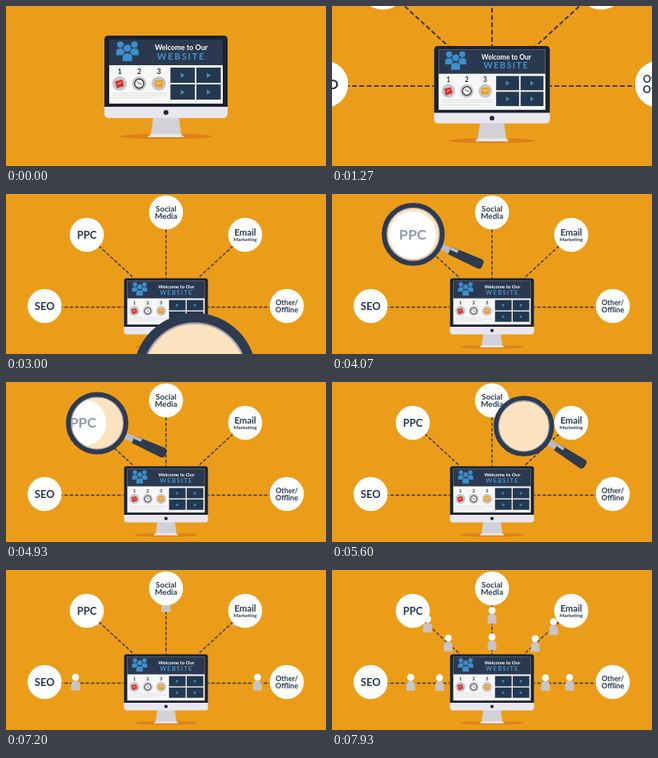
Animation of 400x200 px, one loop 8 s. Source, as an HTML page:

```html
<!DOCTYPE html>
<html lang="en">
<head>
<meta charset="utf-8">
<title>Marketing channels</title>
<style>
  html, body { margin: 0; width: 100%; height: 100%; overflow: hidden; background: #eb9d19; }
  svg { display: block; width: 100vw; height: 100vh; }
  text { font-family: Lato, "Open Sans", sans-serif; font-weight: 700; text-anchor: middle; }
  #channels text { fill: #2b394e; }
  #links line { stroke: #40373a; stroke-width: 1.5; stroke-dasharray: 4.3 2.3; }
</style>
</head>
<body>
<svg viewBox="0 0 400 200">
  <defs>
    <clipPath id="glass"><circle r="33.5"/></clipPath>
    <g id="person">
      <path d="M-5.5 10V3.5Q-5.5-2 0-2T5.5 3.5V10Z" fill="#c9c4c6"/>
      <circle cy="-6.5" r="4.4" fill="#fff"/>
    </g>
    <g id="member">
      <circle cy="-9" r="5"/>
      <path d="M-6.5 7.500V2Q-6.500-3 0-3T6.500 2V7.500Z"/>
    </g>
    <g id="tile">
      <rect width="30.5" height="19" fill="#24384f"/>
      <path d="M13 6.500l5 3.200-5 3.200z" fill="#4489bb"/>
    </g>
  </defs>
  <rect width="400" height="200" fill="#eb9d19"/>

  <g id="scene">
    <g id="links"></g>
    <g id="people"></g>
    <g id="channels"></g>
    <g transform="translate(200 251.5) scale(.682) translate(-200 -251.5)">
      <ellipse cx="200" cy="163" rx="58" ry="3.2" fill="#dd7f1b"/>
      <path d="M184 139H216L219 161H181Z" fill="#d3d1d8"/>
      <path d="M181 160H219L223 164H177Z" fill="#e9e7ec"/>
      <rect x="123" y="37" width="154" height="103" rx="5" fill="#e9e7ee"/>
      <path d="M123 126V42Q123 37 128 37H272Q277 37 277 42V126Z" fill="#1c222e"/>
      <circle cx="200" cy="133" r="3.1" fill="#2b2a33"/>
      <rect x="129" y="42" width="142" height="80" fill="#f7f7f8"/>
      <rect x="129" y="42" width="142" height="32" fill="#2a394f"/>
      <g fill="#3f8fcb">
        <use href="#member" transform="translate(143 55.5) scale(.8)"/>
        <use href="#member" transform="translate(160.500 55.5) scale(.8)"/>
        <use href="#member" x="151.700" y="61.800" stroke="#2a394f"/>
      </g>
      <text x="219" y="55.500" font-size="9" fill="#fff">Welcome to Our</text>
      <text x="219" y="66.800" font-size="11.300" letter-spacing="1.700" fill="#4393cf">WEBSITE</text>
      <g font-size="9" fill="#34343c">
        <text x="142" y="85">1</text><text x="166.500" y="85">2</text><text x="191" y="85">3</text>
      </g>
      <g fill="#c6c5c9">
        <circle cx="142" cy="97" r="9"/><circle cx="166.500" cy="97" r="9"/><circle cx="191" cy="97" r="9"/>
      </g>
      <path d="M136.500 94l9-2 2 8-9 3z" fill="#d8322f"/>
      <path d="M140 97.500l4-2" stroke="#fff"/>
      <circle cx="166.500" cy="97" r="5.700" fill="#fff" stroke="#35353d" stroke-width="1.400"/>
      <path d="M164 94.500l2.500 2.500h3" fill="none" stroke="#35353d"/>
      <rect x="186" y="92.500" width="10" height="9" rx="1" fill="#f0a022"/>
      <path d="M188 95q3 4 6 0" fill="none" stroke="#fff"/>
      <path d="M133 109H201M133 112H201M133 115H185" stroke="#d6d5d8" stroke-width=".8"/>
      <use href="#tile" x="205.500" y="77"/><use href="#tile" x="238" y="77"/>
      <use href="#tile" x="205.500" y="98"/><use href="#tile" x="238" y="98"/>
    </g>
  </g>

  <g id="lens">
    <g id="handle">
      <rect x="36" y="-4" width="16" height="8" fill="#b9bac2"/>
      <path d="M50-5L90-6.500Q95-6.500 95-2V2Q95 6.500 90 6.500L50 5Z" fill="#2e3a4d"/>
      <path d="M50-3H60" stroke="#b9bac2" stroke-width="4"/>
    </g>
    <g clip-path="url(#glass)">
      <circle r="34" fill="#f7c781"/>
      <g id="view"><use href="#channels"/></g>
      <circle r="34" fill="#fff" opacity=".5"/>
    </g>
    <circle r="36" fill="none" stroke="#2e3a4f" stroke-width="6.800"/>
    <circle r="32.800" fill="none" stroke="#a9a9b0" stroke-width="1.200"/>
  </g>
</svg>

<script>
const LOOP = 8000, SPEED = 0.065, WALK_AT = 7930;
const $ = id => document.getElementById(id);

// at: bubble centre, port: line end at the monitor, walkers: distances from the bubble at WALK_AT
// lines: [text, font size, baseline offset]
const channels = [
  { at: [48.3, 140], port: [150, 141.5], walkers: [50, 86], lines: [['SEO', 13, 4.5]] },
  { at: [101, 51], port: [163, 108], walkers: [25, 60], lines: [['PPC', 13, 4.5]] },
  { at: [200, 23], port: [200, 108], walkers: [34, 67], lines: [['Social', 10, -1.5], ['Media', 10, 8]] },
  { at: [299, 51], port: [237, 108], walkers: [30, 61], lines: [['Email', 11.3, 0.8], ['Marketing', 6.4, 7.8]] },
  { at: [351, 140], port: [250, 141.5], walkers: [54, 84], lines: [['Other/', 9.2, -1.5], ['Offline', 9.2, 7.8]] }
];

function add(parent, tag, attrs, text = '') {
  const el = document.createElementNS('http://www.w3.org/2000/svg', tag);
  for (const key in attrs) el.setAttribute(key, attrs[key]);
  el.textContent = text;
  return parent.appendChild(el);
}

for (const c of channels) {
  const [x1] = c.port;
  // side lines run level, just below the bubble centres
  c.end = c.at[1] > 100 ? [c.at[0], c.port[1]] : c.at;
  c.link = add($('links'), 'line', { x1, y1: c.port[1], x2: x1, y2: c.port[1] });
  c.people = c.walkers.map(() => add($('people'), 'use', { href: '#person' }));
  c.bubble = add($('channels'), 'g', {});
  add(c.bubble, 'circle', { r: 21.3, fill: '#fff' });
  for (const [label, size, y] of c.lines) add(c.bubble, 'text', { y, 'font-size': size }, label);
}

const mix = (a, b, p) => a + (b - a) * p;
const span = (t, from, to) => Math.min(1, Math.max(0, (t - from) / (to - from)));
const ease = p => (1 - Math.cos(Math.PI * p)) / 2;
const place = (el, value) => el.setAttribute('transform', value);

function drawChannels(t) {
  const zoom = mix(1, 0.682, ease(span(t, 870, 2270))) / 0.682;
  place($('scene'), `translate(200 251.5) scale(${zoom}) translate(-200 -251.5)`);
  const grow = ease(span(t, 70, 720));
  const pop = ease(span(t, 480, 870));
  for (const { at: [x, y], end, port: [px, py], walkers, link, people, bubble } of channels) {
    link.setAttribute('x2', mix(px, end[0], grow));
    link.setAttribute('y2', mix(py, end[1], grow));
    place(bubble, `translate(${x} ${y}) scale(${pop})`);
    const length = Math.hypot(px - x, py - y);
    people.forEach((person, i) => {
      const d = walkers[i] + (t - WALK_AT) * SPEED;
      person.style.display = d > 0 ? '' : 'none';
      place(person, `translate(${mix(x, px, d / length)} ${mix(y, py, d / length)})`);
    });
  }
}

function drawLens(t) {
  const enter = ease(span(t, 2600, 3750));
  const slide = ease(span(t, 4700, 6130));
  const leave = span(t, 6700, 7250) ** 2;
  const x = mix(286, 101.5, enter) + 198 * slide + 180 * leave;
  const y = mix(291, 50.3, enter) + 6 * Math.sin(Math.PI * slide) + 30 * leave;
  const scale = mix(90, 39, enter) / 39 - 0.05 * Math.sin(Math.PI * slide);
  $('lens').style.display = t > 2600 && t < 7250 ? '' : 'none';
  place($('lens'), `translate(${x} ${y}) scale(${scale})`);
  place($('handle'), `rotate(${24 + 18 * slide * slide})`);
  place($('view'), `scale(1.38) translate(${-x} ${-y})`);
}

const start = performance.now();
function frame() {
  const t = (performance.now() - start) % LOOP;
  drawChannels(t);
  drawLens(t);
  requestAnimationFrame(frame);
}
frame();
</script>
</body>
</html>
```
